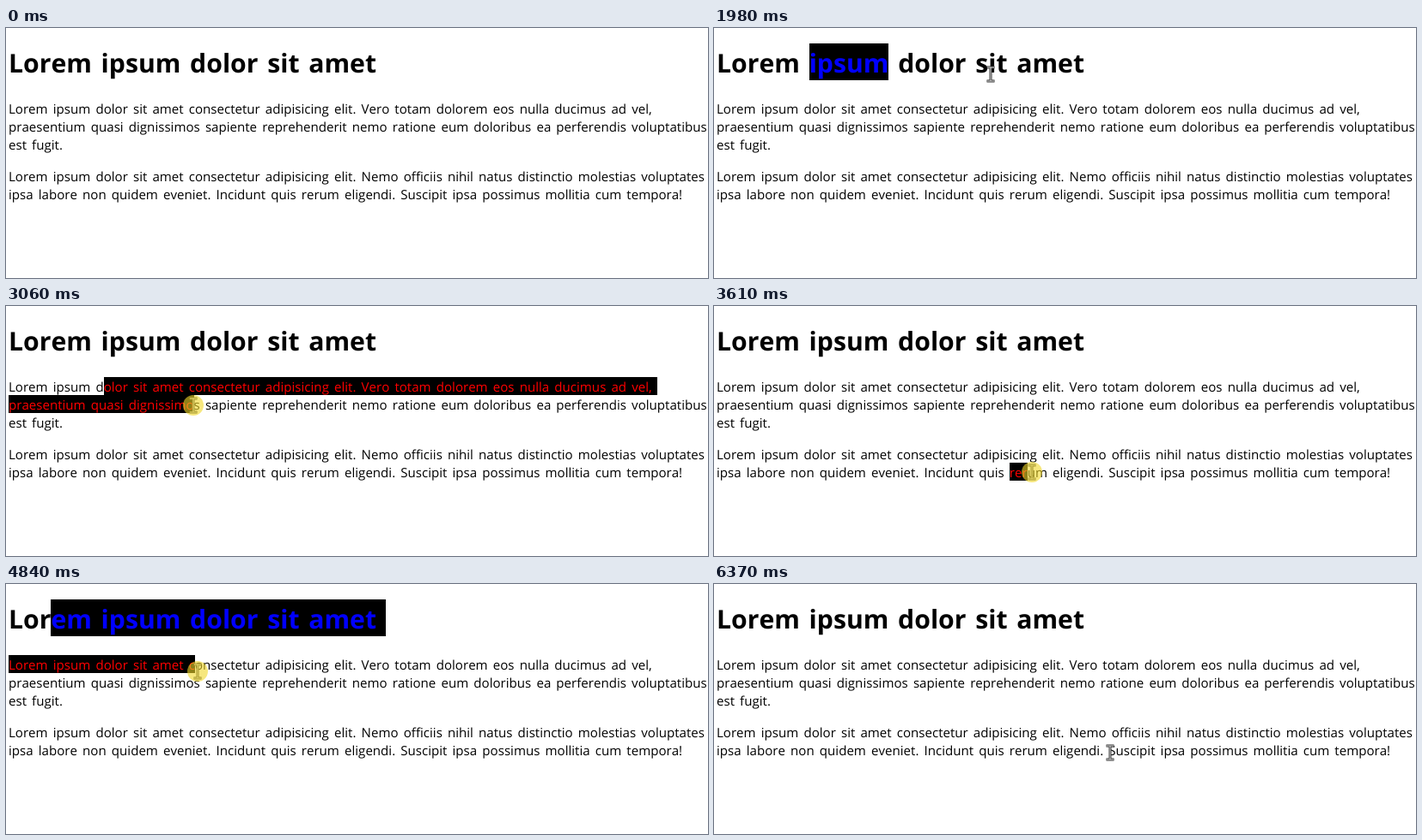
An HTML page for the animation above (6.5 s loop, 817 by 292 pixels).

```html
<!DOCTYPE html>
<html lang="la">
<head>
<meta charset="utf-8">
<title>Text selection</title>
<style>
  html, body { margin: 0; width: 100%; height: 100%; overflow: hidden; background: #fff; }
  body { position: relative; color: #000; }
  h1, p { position: absolute; left: 3px; margin: 0; white-space: pre; }
  h1, p { font-family: "Open Sans", "Noto Sans", sans-serif; }
  h1, p { font-kerning: none; font-variant-ligatures: none; text-rendering: geometricPrecision; }
  h1 { top: 18px; font-size: 30.2px; line-height: 45px; word-spacing: 2.85px; }
  p { font-size: 15.1px; line-height: 25px; word-spacing: 2.18px; }
  h1 .line { height: 43px; }
  p .line { height: 21px; }
  mark { display: inline-block; vertical-align: top; height: 100%; background: #000; color: #f00; }
  h1 mark { color: #00f; }
  svg { position: absolute; left: 0; top: 0; overflow: visible; }
</style>
</head>
<body>
<h1><div class="line">Lorem ipsum dolor sit amet</div></h1>
<p style="top:83px"><span class="line">Lorem ipsum dolor sit amet consectetur adipisicing elit. Vero totam dolorem eos nulla ducimus ad vel,</span><span class="line">praesentium quasi dignissimos sapiente reprehenderit nemo ratione eum doloribus ea perferendis voluptatibus</span><span class="line">est fugit.</span></p>
<p style="top:162px"><span class="line">Lorem ipsum dolor sit amet consectetur adipisicing elit. Nemo officiis nihil natus distinctio molestias voluptates</span><span class="line">ipsa labore non quidem eveniet. Incidunt quis rerum eligendi. Suscipit ipsa possimus mollitia cum tempora!</span></p>
<style>.line { display: block; }</style>
<svg id="pointer" width="1" height="1">
  <g id="beam" fill="none">
    <path d="M-4.5-8H4.5M0-8V8M-4.5 8H4.5" stroke="#333" stroke-width="3"/>
    <path d="M-4-8H4M0-8V8M-4 8H4" stroke="#ddd"/>
  </g>
  <path id="arrow" d="M.5.5V16.5L4.2 13 6.8 19 9.2 18 6.7 12.2H11.8Z" fill="#fff" stroke="#000"/>
  <circle id="press" r="12" fill="#f0d728" fill-opacity=".6"/>
</svg>
<script>
const LOOP = 6500, STEP = 68, ENTER = 200;

// Each gesture glides the pointer to a point; "hold" keeps the button down from its start.
const gestures = [
  { at: ENTER, ms: 350, x: 110, y: 26 },
  { at: 750, ms: 520, x: 202, y: 43, hold: 620 },
  { at: 1430, ms: 600, x: 323, y: 54 },
  { at: 2050, ms: 270, x: 436, y: 54, hold: 410 },
  { at: 2460, ms: 180, x: 120, y: 102 },
  { at: 2860, ms: 270, x: 230, y: 118, hold: 270 },
  { at: 3140, ms: 200, x: 347, y: 194 },
  { at: 3480, ms: 560, x: 640, y: 190, hold: 680 },
  { at: 4160, ms: 440, x: 60, y: 40 },
  { at: 4780, ms: 110, x: 452, y: 190, hold: 390 },
  { at: 5570, ms: 70, x: 461, y: 197 },
  { at: 6300, ms: 70, x: 461, y: 197, hold: 70 }
];

const byId = id => document.getElementById(id);
const show = (id, on) => { byId(id).style.display = on ? '' : 'none'; };
const ease = u => u ** 3 * (10 - 15 * u + 6 * u * u);

const lines = [...document.querySelectorAll('.line')].map(el => {
  const text = el.textContent;
  const range = document.createRange();
  const middles = [...text].map((_, i) => {
    range.setStart(el.firstChild, i);
    range.setEnd(el.firstChild, i + 1);
    const box = range.getBoundingClientRect();
    return (box.left + box.right) / 2;
  });
  return { el, text, middles, top: el.getBoundingClientRect().top };
});

function pointerAt(t) {
  let x = 221, y = 240;
  for (const g of gestures) {
    if (g.at > t) break;
    const k = ease(Math.min(1, (t - g.at) / g.ms));
    x += (g.x - x) * k;
    y += (g.y - y) * k;
  }
  return { x, y };
}

function caretAt({ x, y }) {
  const line = Math.max(0, lines.filter(l => l.top <= y).length - 1);
  return { line, char: lines[line].middles.filter(m => m < x - 3).length };
}

// Wraps the characters in a mark; a selection running on past the line also covers its line break.
function select({ el, text }, from, to, runsOn) {
  const mark = document.createElement('mark');
  mark.textContent = text.slice(from, to) + (runsOn ? ' ' : '');
  el.replaceChildren(text.slice(0, from), mark, text.slice(to));
}

function drawSelection(drag, t) {
  const start = caretAt(pointerAt(drag.at));
  const end = caretAt(pointerAt(Math.max(drag.at, Math.min(t, drag.at + drag.hold))));
  lines.forEach((line, i) => {
    const inside = i >= start.line && i <= end.line;
    const runsOn = inside && i < end.line;
    const from = i === start.line ? start.char : 0;
    const to = runsOn ? line.text.length : inside ? Math.max(from, end.char) : from;
    select(line, from, to, runsOn);
  });
}

function draw() {
  const now = (performance.now() - origin) % LOOP;
  const t = 70 + STEP * Math.floor((now - 60) / STEP);
  const drag = gestures.filter(g => g.hold && g.at <= now).pop();

  if (drag) drawSelection(drag, t);
  else lines.forEach(line => select(line, 0, 0, false));

  const { x, y } = pointerAt(t);
  byId('pointer').style.transform = `translate(${Math.round(x)}px, ${Math.round(y)}px)`;
  show('pointer', now >= ENTER);
  show('press', drag && now < drag.at + drag.hold);
  show('arrow', y > 206);
  show('beam', y <= 206);
  requestAnimationFrame(draw);
}

const origin = performance.now();
draw();
</script>
</body>
</html>
```
